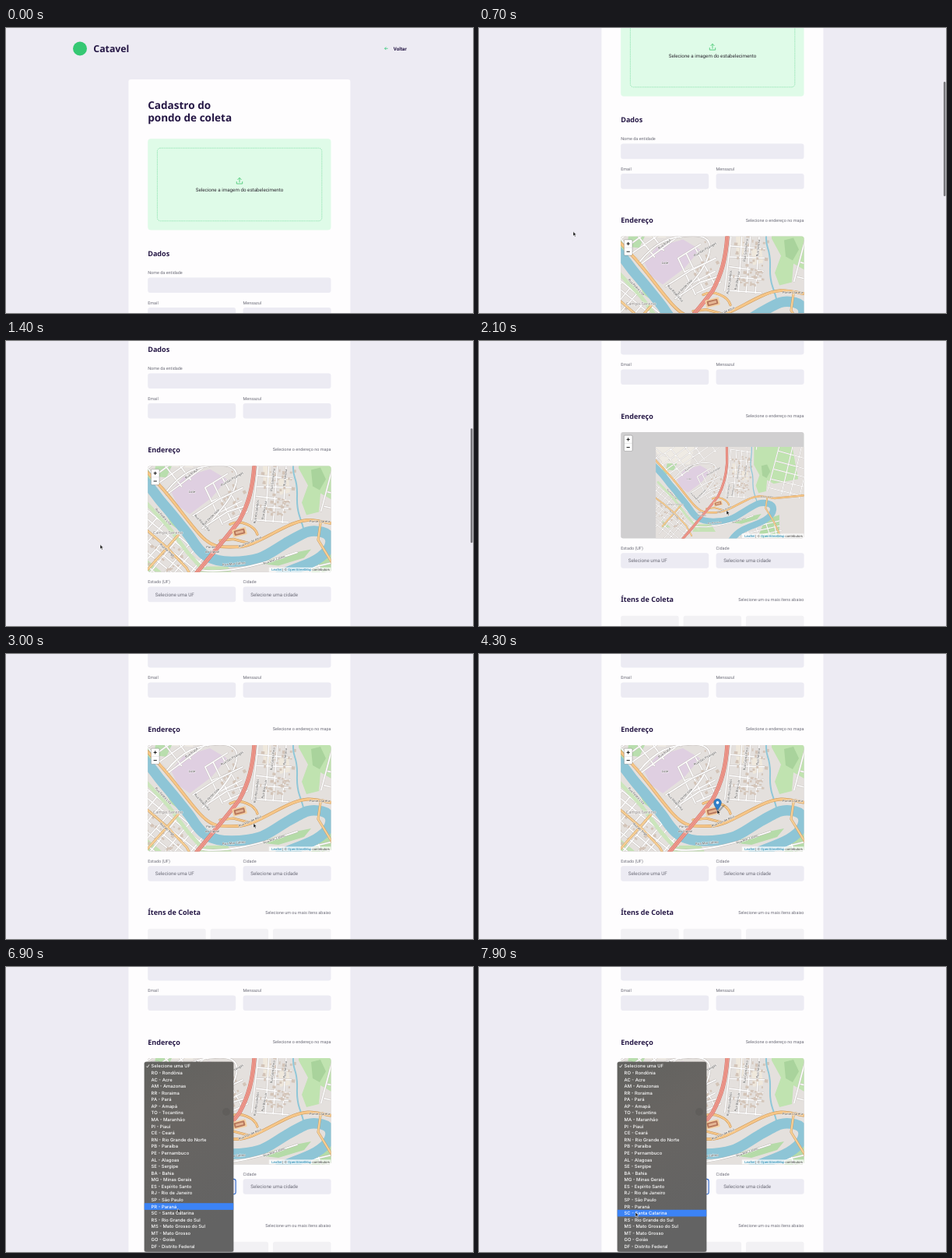
Recreate the animation shown at these times as an HTML page. Size 600x366 px, loop 8000 ms.

```html
<!DOCTYPE html>
<html lang="pt-BR">
<head>
<meta charset="utf-8">
<title>Cadastro</title>
<style>
html, body { margin: 0; width: 100%; height: 100%; overflow: hidden; background: #edebf3; }
svg { display: block; width: 100vw; height: 100vh; }
text { font-family: Roboto, sans-serif; text-rendering: geometricPrecision; }
.head { font-family: "Noto Sans", sans-serif; font-weight: 700; fill: #251745; }
.menu text { font-family: Inter, sans-serif; font-size: 5.85px; font-weight: 500; fill: #fff; }
.map text { font-family: "Noto Sans", sans-serif; font-size: 4.1px; fill: #4c4947; text-anchor: middle;
  paint-order: stroke; stroke: #fffc; stroke-width: .9px; }
.map .area { font-size: 5.6px; fill: #8a8482; }
.credit text { font-family: "Liberation Sans", Arial, sans-serif; font-size: 4.3px; fill: #333; }
.road { fill: none; stroke-linecap: round; stroke-linejoin: round; }
</style>
</head>
<body>
<svg id="stage" viewBox="0 0 600 366"></svg>
<script>
const LOOP = 8000, END = 322.5, ROW = 8.58, ROW0 = 127.3;
const STATES = ['Selecione uma UF', 'RO - Rondônia', 'AC - Acre', 'AM - Amazonas', 'RR - Roraima',
  'PA - Pará', 'AP - Amapá', 'TO - Tocantins', 'MA - Maranhão', 'PI - Piauí', 'CE - Ceará',
  'RN - Rio Grande do Norte', 'PB - Paraíba', 'PE - Pernambuco', 'AL - Alagoas', 'SE - Sergipe',
  'BA - Bahia', 'MG - Minas Gerais', 'ES - Espírito Santo', 'RJ - Rio de Janeiro', 'SP - São Paulo',
  'PR - Paraná', 'SC - Santa Catarina', 'RS - Rio Grande do Sul', 'MS - Mato Grosso do Sul',
  'MT - Mato Grosso', 'GO - Goiás', 'DF - Distrito Federal'];

let seed = 11;
const rnd = () => (seed = seed * 16807 % 2147483647) / 2147483647;
const text = (x, y, s, size, fill, extra = '') =>
  `<text x="${x}" y="${y}" font-size="${size}" fill="${fill}" ${extra}>${s}</text>`;
const head = (x, y, s, size) => `<text class="head" x="${x}" y="${y}" font-size="${size}">${s}</text>`;
const box = (x, y, w, h, fill, r = 3, extra = '') =>
  `<rect x="${x}" y="${y}" width="${w}" height="${h}" rx="${r}" fill="${fill}" ${extra}/>`;
const label = (x, y, s) => text(x, y, s, 5.47, '#6c6c78');
const hint = (y, s) => text(417.5, y, s, 5.47, '#6c6c78', 'text-anchor="end"');
const field = (x, y, w, s = '') => box(x, y, w, 19.6, '#ecebf3') +
  text(x + 9.6, y + 12, s, 6.25, '#6c6c78');
const shape = (d, fill) => `<path d="${d}" fill="${fill}"/>`;
const road = (d, w, color, edge) =>
  `<path class="road" d="${d}" stroke="${edge}" stroke-width="${w + .9}"/>` +
  `<path class="road" d="${d}" stroke="${color}" stroke-width="${w}"/>`;

// street grid: centre, size, angle and spacing
function grid(cx, cy, w, h, angle, dx, dy) {
  let d = '';
  for (let x = -w / 2; x <= w / 2; x += dx * (.7 + rnd() * .6)) d += `M${x} ${-h / 2}l${rnd() * 6 - 3} ${h}`;
  for (let y = -h / 2; y <= h / 2; y += dy * (.7 + rnd() * .6)) d += `M${-w / 2} ${y}l${w} ${rnd() * 6 - 3}`;
  return `<g transform="translate(${cx} ${cy}) rotate(${angle})">${road(d, 1.5, '#fff', '#c9c3c0')}</g>`;
}
function houses(n, cx, cy, w, h, angle) {
  let s = '';
  for (let i = 0; i < n; i++)
    s += box((rnd() - .5) * w, (rnd() - .5) * h, 1.5 + rnd() * 3, 1.5 + rnd() * 3, '#d3c4b8', 0);
  return `<g transform="translate(${cx} ${cy}) rotate(${angle})">${s}</g>`;
}
const street = (x, y, angle, s) => `<text transform="translate(${x} ${y}) rotate(${angle})">${s}</text>`;

function mapArt() {
  const river = 'M60 20C100 60 130 90 160 118S188 150 202 166 222 190 234 205 250 240 290 240 336 230 360 216 390 198 406 202 420 222 404 234 372 247 352 258 320 290 320 300';
  const bank = 'M90 30C130 70 165 108 190 134S230 184 248 204 276 221 296 221 336 206 362 194 396 187 420 191L530 180';
  const trunk = 'M318 0L319 117C317 145 312 165 300 187 286 206 268 226 246 253L205 300';
  return box(0, 0, 600, 366, '#e4e0dd', 0) +
    shape('M160 75H252L240 119 182 117Z', '#efebe4') +
    shape('M212 150L228 131 262 121 284 134 264 158 236 179 221 168Z', '#dfcfe1') +
    shape('M192 117H213L206 132 190 130ZM182 119L196 134 190 142 182 136ZM206 180L220 190 226 202 212 192Z', '#b9deae') +
    shape('M377 40H450L470 150 418 160 404 152 402 176 386 180 380 164 388 142 376 120Z', '#c0e3b0') +
    shape('M392 122L404 119 411 134 403 148 394 143Z', '#a9d39c') +
    shape('M408 234L430 226V275H384L396 245ZM322 242L372 228 392 224 383 235 350 245Z', '#b5dba8') +
    shape('M182 238L200 253H182ZM252 246H285L295 262H246ZM60 180L130 210 100 290 40 270Z', '#c5e2b5') +
    shape('M330 117H340V140L331 142ZM350 134L363 131 365 151 352 154Z', '#efe8dc') +
    grid(185, 226, 135, 76, 40, 13, 11) + grid(238, 96, 120, 62, -36, 22, 15) +
    grid(345, 139, 44, 100, 5, 11, 17) + grid(283, 160, 34, 52, -28, 13, 15) +
    grid(390, 264, 90, 32, -14, 22, 11) + grid(475, 110, 100, 160, 14, 22, 22) +
    grid(105, 120, 110, 130, 38, 17, 17) + grid(330, 45, 130, 70, 8, 17, 17) +
    houses(70, 347, 140, 42, 78, 5) + houses(30, 195, 224, 70, 46, 40) + houses(16, 286, 152, 34, 50, -28) +
    `<path class="road" d="M368 60C378 95 364 112 371 132S370 160 377 181 382 196 381 204" stroke="#8fc7d8" stroke-width="2"/>` +
    `<path class="road" d="M182 149L216 185 243 221 268 249" transform="translate(-9 8)" stroke="#cbe5bc" stroke-width="5"/>` +
    `<path class="road" d="${river}" stroke="#8ec5d6" stroke-width="13.5"/>` +
    road('M206 150C226 125 245 116 275 116S298 138 289 155 270 178 256 198', 1.7, '#fff', '#bfb9b6') +
    road('M240 181L273 160 304 145M252 197L284 176 306 169', 1.7, '#fff', '#bfb9b6') +
    road('M160 185L184 202 207 222 232 248 244 270M182 250L207 222 221 206', 2.2, '#f7cf95', '#c99c64') +
    road('M246 250C280 257 330 243 374 228', 1.8, '#fff', '#bfb9b6') +
    road(bank, 3, '#f6c688', '#ca9657') +
    road('M288 192C301 185 320 194 323 205M275 213L292 211 311 216', 2.3, '#f6c688', '#ca9657') +
    road('M404 191L401 212 418 240 430 266', 2.2, '#f7cf95', '#c99c64') +
    road(trunk, 4.4, '#ee988b', '#c96f68') +
    `<path class="road" d="${trunk}" stroke="#d87970" stroke-width=".5"/>` +
    `<g transform="translate(300 202) rotate(-14)">${box(-9, -5, 18, 10, '#f3d0a3', 1)}${box(-7, -3.3, 14, 6.6, '#b9785c', 1)}${box(-5, -1.5, 10, 3, '#e4b594', .5)}</g>` +
    street(239, 152, 0, 'Lote') + street(201, 183, 46, 'Rua Pedra Lisa') +
    street(251, 191, 47, 'Rua Ribeirinha') + street(206, 226, 41, 'Rua do Ingá') +
    street(239, 128, -37, 'Rua Araçá') + street(264, 184, -44, 'Rua Verde Vale') +
    street(291, 135, -30, 'Rua das Pitangas') + street(333, 174, -80, 'Rua Boa Lua') +
    street(323, 176, -82, 'Rua dos Jambos') + street(344, 135, -83, 'Rua Garoa Fina') +
    street(360, 132, -84, 'Rua Serena') + street(314, 216, -23, 'Rua Flor de Abril') +
    street(293, 244, -5, 'Rua Mar Calmo') + street(345, 239, -19, 'Rua Mar Calmo') +
    street(403, 190, 0, 'Ponte Clareta') + street(263, 223, 0, 'Ponte') + street(265, 229, 0, 'do Cipoal') +
    `<text class="area" x="208" y="205">Campo Sereno</text>`;
}

const pin = `<g id="pin"><path d="M0 0L7-8 10-8 3 0Z" fill="#0004"/>
  <path d="M0 0C-1-4-4.8-7-4.8-11.2A4.8 4.8 0 0 1 4.8-11.2C4.8-7 1-4 0 0Z" fill="#2f7fc9" stroke="#2563a0" stroke-width=".6"/>
  <circle cy="-11.1" r="1.8" fill="#fff"/></g>`;

const page = `<g id="page">
  <circle cx="95" cy="26.5" r="9" fill="#35c873"/>${head(112.3, 31, 'Catavel', 12.3)}
  <path d="M490.6 26.3H486.6M488.3 24.5L486.5 26.3 488.3 28.1" fill="none" stroke="#34cb79" stroke-width=".8"/>
  ${text(497.8, 28.6, 'Voltar', 6.25, '#251745', 'font-weight="700"')}
  ${box(157.4, 66, 285, 900, '#fefdfe', 3)}
  ${head(182.2, 103.8, 'Cadastro do', 13.55)}${head(182.2, 120.4, 'pondo de coleta', 13.55)}
  ${box(182.2, 142.3, 235.3, 117.3, '#dffbe8', 4)}
  ${box(194.4, 154.2, 211.4, 93.6, 'none', 4, 'stroke="#68d795" stroke-width=".6" stroke-dasharray="1.4 .8"')}
  <path d="M296.3 197.5V200H303.7V197.5M300 198V192.6M297.8 194.6L300 192.4 302.2 194.6" fill="none" stroke="#4ecb79" stroke-width=".9" stroke-linecap="round"/>
  ${text(300, 209.8, 'Selecione a imagem do estabelecimento', 6.25, '#2c2931', 'text-anchor="middle"')}
  ${head(182.2, 293, 'Dados', 9.05)}
  ${label(182.2, 316.2, 'Nome da entidade')}${field(182.2, 320.5, 235.3)}
  ${label(182.2, 354.8, 'Email')}${field(182.2, 359, 113)}
  ${label(304.6, 354.8, 'Mensazul')}${field(304.6, 359, 113)}
  ${head(182.2, 422, 'Endereço', 9.05)}${hint(420.5, 'Selecione o endereço no mapa')}
  <g transform="translate(0 ${END})">
    <g clip-path="url(#frame)" class="map">
      ${box(182, 117, 236, 137, '#d0cfd0', 0)}
      <g id="zoom"><g id="tiles">${mapArt()}</g></g>${pin}
      <g class="credit">${box(337.8, 247.4, 80, 6, '#fffc', 0)}</g>
    </g>
    <g class="credit"><text x="416" y="251.9" text-anchor="end"><tspan fill="#0078a8">Leaflet</tspan> | © <tspan fill="#0078a8">OpenStreetMap</tspan> contributors</text></g>
    ${box(186.4, 121.2, 10.6, 20.2, '#fff', 1.2, 'stroke="#0004" stroke-width=".8"')}
    <path d="M186.5 131.4H197" stroke="#ccc" stroke-width=".4"/>
    <path d="M189.6 126.4H193.8M191.7 124.3V128.5M189.6 136.6H193.8" stroke="#000" stroke-width=".9"/>
  </g>
  ${label(182.2, 590.5, 'Estado (UF)')}${field(182.2, 594.7, 113, 'Selecione uma UF')}
  ${label(304.6, 590.5, 'Cidade')}${field(304.6, 594.7, 113, 'Selecione uma cidade')}
  ${head(182.2, 657.4, 'Ítens de Coleta', 9.05)}${hint(656, 'Selecione um ou mais ítens abaixo')}
  ${[182.2, 262.6, 343].map(x => box(x, 675.3, 74.5, 70, '#f2f1f4')).join('')}
</g>`;

const menu = `<g id="menu" class="menu">
  ${box(182.4, 272.4, 112.8, 19.4, 'none', 2.5, 'stroke="#2f68c8" stroke-width="1.1"')}
  ${box(177.2, 121.6, 115.6, 245, '#0003', 3)}
  ${box(177.8, 121.8, 114.4, 244, 'url(#glass)', 2.5)}
  <circle cx="283" cy="186" r="5" fill="#0001"/>
  <rect id="pick" x="177.8" width="114.4" height="8.7" fill="#3c83f5"/>
  <path d="M180.4 127.5L181.6 129 183.8 125.5" fill="none" stroke="#fff" stroke-width=".8"/>
  ${STATES.map((s, i) => `<text x="186.6" y="${ROW0 + i * ROW + 2.1}">${s}</text>`).join('')}
</g>`;

const stage = document.getElementById('stage');
stage.innerHTML = `<defs>
  <clipPath id="frame"><rect x="182.2" y="117" width="235.3" height="136.4" rx="3"/></clipPath>
  <clipPath id="loaded"><rect x="168" y="82" width="400" height="260"/></clipPath>
  <linearGradient id="glass" x2=".3" y2="1"><stop stop-color="#62625f"/><stop offset=".4" stop-color="#686562"/><stop offset="1" stop-color="#636363"/></linearGradient>
  </defs>${box(0, 0, 600, 366, '#edebf3', 0)}${page}
  <rect id="bar" x="596.9" width="2.6" height="147" rx="1.3" fill="#77767b"/>${menu}
  <path id="cursor" d="M0 0V5.6L1.3 4.5 2.2 6.6 3.2 6.2 2.3 4.1H4Z" fill="#111" stroke="#fff" stroke-width=".5"/>`;
const el = id => document.getElementById(id);
const [pageEl, zoomEl, tilesEl, pinEl, barEl, menuEl, pickEl, cursorEl] =
  ['page', 'zoom', 'tiles', 'pin', 'bar', 'menu', 'pick', 'cursor'].map(el);

const part = (t, a, b) => Math.min(1, Math.max(0, (t - a) / (b - a)));
const out = p => 1 - (1 - p) ** 3;
const smooth = p => p * p * (3 - 2 * p);
const show = (node, on) => node.setAttribute('visibility', on ? 'visible' : 'hidden');
const move = (node, x, y, more = '') => node.setAttribute('transform', `translate(${x} ${y})${more}`);

// time, x, y
const PATH = [[0, 121, 261.5], [1500, 121, 261.5], [1950, 318, 217.5], [3300, 318, 217.5], [3900, 306, 200],
  [4400, 306, 200], [4700, 283, 199], [4850, 283, 199], [5300, 246, 282], [5600, 246, 282], [5850, 253.6, 285],
  [6000, 253.6, 285], [6500, 240, 340], [7100, 214, 300], [7700, 201, 315], [8000, 201, 315]];
function pointer(t) {
  const i = PATH.findIndex(k => k[0] > t), a = PATH[i - 1], b = PATH[i];
  const p = smooth(part(t, a[0], b[0]));
  return [a[1] + (b[1] - a[1]) * p, a[2] + (b[2] - a[2]) * p];
}

function draw(t) {
  const scroll = 176.5 * smooth(out(part(t, 230, 1100))) + 146 * smooth(part(t, 1120, 1560));
  move(pageEl, 0, -scroll);
  barEl.setAttribute('y', scroll * .402);
  barEl.setAttribute('opacity', t < 280 ? 0 : 1 - part(t, 1750, 1950));

  const s = 1 - .5 * (out(part(t, 2000, 2250)) - out(part(t, 2650, 2900)));
  move(zoomEl, 318, 219, ` scale(${s}) translate(-318 -219)`);
  tilesEl.setAttribute('clip-path', t < 2350 ? 'url(#loaded)' : 'none');

  show(pinEl, t >= 4000);
  move(pinEl, t < 4700 ? 306.5 : 283, t < 4700 ? 202 : 199);

  const [x, y] = pointer(t);
  show(cursorEl, t >= 300);
  move(cursorEl, x, y);
  show(menuEl, t >= 5400);
  pickEl.setAttribute('y', ROW0 + Math.round((y - ROW0) / ROW) * ROW - 4.3);
}

const start = performance.now();
function tick() {
  draw((performance.now() - start) % LOOP);
  requestAnimationFrame(tick);
}
draw(0);
tick();
</script>
</body>
</html>
```
